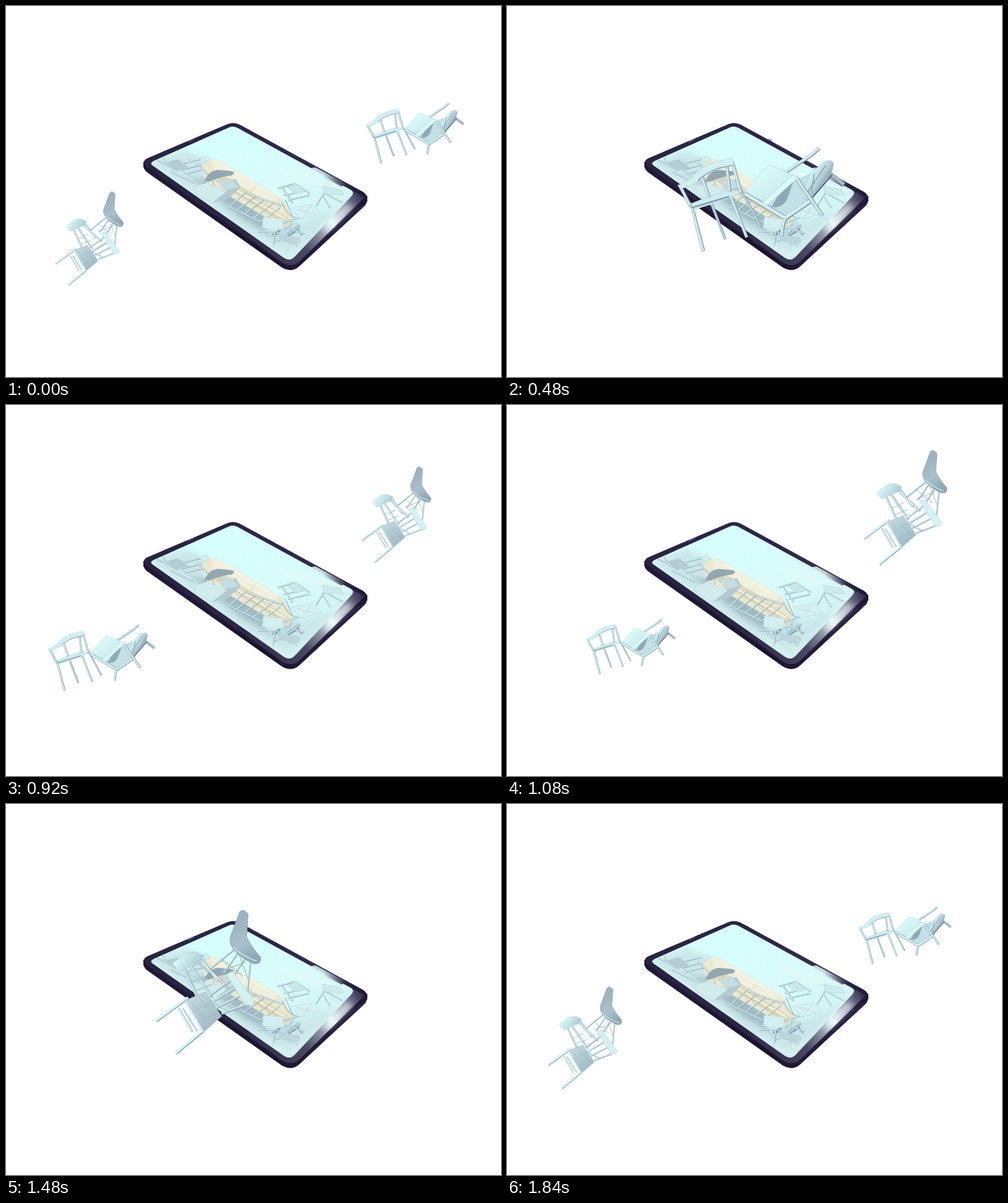
An HTML page for the animation above (1.88 s loop, 800x600 px).

```html
<!DOCTYPE html>
<html lang="en">
<head>
<meta charset="utf-8">
<title>Chairs around a tablet</title>
<style>
  html, body { margin: 0; width: 100%; height: 100%; overflow: hidden; background: #fff; }
  svg { display: block; width: 800px; height: 600px; }
</style>
</head>
<body>
<svg id="stage" viewBox="0 0 800 600" fill="none" stroke-linejoin="round"></svg>
<script>
const LOOP = 1880, STEP = 40, HALF = LOOP / 2;

const fill = (d, c, more = '') => `<path d="${d}" fill="${c}" ${more}/>`;
const line = (d, w, c) => `<path d="${d}" stroke="${c}" stroke-width="${w}"/>`;
// A rod has a shaded edge and a lit core.
const rod = (d, w, lit = '#cdeaee') =>
  line(d, w, '#8199a8') + `<g transform="translate(-.5 -.4)">${line(d, w * .7, lit)}</g>`;
const pad = (d, c) => fill(d, c, 'stroke="#b3d0d7" stroke-width=".6"');
const grad = (id, box, ...stops) => {
  const [x1, y1, x2, y2] = box;
  return `<linearGradient id="${id}" gradientUnits="userSpaceOnUse" x1="${x1}" y1="${y1}" x2="${x2}" y2="${y2}">` +
    stops.map(([at, c]) => `<stop offset="${at}" stop-color="${c}"/>`).join('') + '</linearGradient>';
};

const armchair =
  rod('M622 203L647 249', 3.2, '#b5d2da') + rod('M583 214L602 264', 3.6, '#b5d2da') +
  rod('M607 205L629 262', 4) + rod('M560 221L575 279', 4.4) +
  pad('M557 221L582 211L606 203L625 204L607 213L565 227Z', '#cdecef') +
  line('M560 225L607 211', 1.8, '#7e98a8') +
  rod('M546 198L559 223', 4.4) + rod('M573 186L582 212', 4) +
  rod('M604 172L608 205', 4) + rod('M611 168L622 207', 4.2) +
  pad('M543 197Q556 194 565 182Q572 174 590 168L611 163L613 172L593 177Q576 183 568 192Q557 200 546 201Z', '#d0eff1') +
  line('M568 191Q576 183 593 176L612 172', 1.2, '#86a2b0');

const lounge =
  rod('M719 151L710 159L677 181', 4.4) +
  rod('M733 183L750 196', 5, '#a5bfca') +
  pad('M657 204L708 183L716 200L696 223L676 236L640 214Z', '#c2e0e5') +
  pad('M724 168Q735 163 737 171L734 183L707 215Q699 218 697 209L709 182Z', 'url(#cush)') +
  line('M735 184L708 215', 1.8, '#56647f') +
  line('M727 172L703 208M713 182L709 207', 1.2, '#849fac') +
  pad('M628 203L656 172Q673 176 691 188L678 216Q672 226 660 224Q644 213 628 208Z', 'url(#back)') +
  fill('M687 192L678 216Q672 226 660 224L667 211Z', '#8fa8b5') +
  rod('M627 208L677 238L712 214', 5.6, '#d2f2f3') +
  rod('M677 238Q673 247 673 260', 4.6) +
  rod('M690 187L723 235', 4.8) +
  pad('M648 219L686 184L693 187L654 222Z', '#d9fbfa');

const shell =
  rod('M677 124L645 150M682 128L664 154M690 137L672 165M698 140L694 178', 2.4) +
  line('M660 136L688 158M684 132L695 162M661 152L692 140', 1, '#9bb8c2') +
  fill('M684 76Q689 70 695 79L693 108Q700 122 711 134Q712 144 702 142Q684 135 675 122Q669 112 674 103Z', 'url(#shellFill)', 'stroke="#8ca5b1" stroke-width=".8"') +
  line('M676 121Q688 133 706 139', 1.6, '#c7dfe5');

const stool =
  rod('M612 147L631 189M621 145L649 186M633 139L668 172M636 137L656 165', 3.4) +
  line('M622 167L641 158M628 177L648 169', 1.2, '#a4c0ca') +
  pad('M597 142L616 128L627 127L638 132L635 139L606 152Z', 'url(#stoolFill)');

const spindle =
  rod('M618 186L577 216M637 229L602 258', 3.8, '#d9fbfa') +
  rod('M605 199L623 230', 2.6, '#d9fbfa') + rod('M611 200L629 229', 2) +
  rod('M645 184L672 164M650 191L680 173M655 199L688 182M661 207L698 193', 2.8) +
  rod('M634 184L672 204', 2.2) +
  pad('M667 156L675 152L703 190L701 195L692 196Z', '#d2f2f3') +
  fill('M613 190L640 179L661 210L637 231Z', 'url(#seat)', 'stroke="#9bb5bf" stroke-width=".6"') +
  line('M622 192L646 221M632 186L655 213M622 206L648 190M631 218L656 202', .6, '#98b2bd') +
  line('M614 191L637 230', 2.2, '#d3f1f2');

const face = 'M229 246L358 191Q368 187 378 192L576 300Q588 307 579 316L474 413Q462 424 446 415L228 261Q217 252 229 246Z';
const screen = 'M240 250L359 197Q366 193 374 197L555 296Q565 301 558 308L467 405Q459 414 449 407L237 258Q231 254 240 250Z';

const place = (shape, x, y, s, turn) =>
  `<g transform="translate(${x} ${y}) rotate(${turn}) scale(${s})">${shape}</g>`;
const smallLounge = `<g transform="translate(-690 -206)">${lounge}</g>`;

const sofa =
  fill('M316 259L330 248Q338 246 346 251L442 309L463 341L456 358L438 352L324 286Z', '#eae8d0') +
  fill('M330 248L349 252L441 309L430 321L402 304L336 267Z', '#f1f0dc') +
  fill('M323 274L344 268L459 345L454 357Z', '#e2dcbc') +
  line('M336 267L430 322M369 266L361 281M405 287L394 302', 1, '#d9d3b2') +
  line('M341 281L452 351', 1.2, '#c9c2a0') +
  line('M352 259L426 303M360 291L451 344', 2.5, '#f5f5e6');

const room =
  fill(screen, 'url(#wall)') +
  '<g clip-path="url(#glass)">' +
    fill('M230 252L290 233L350 258L475 352L530 332L458 415Z', '#cbe7ea', 'filter="url(#soft)"') +
    fill('M300 277L350 289L465 355L440 376L382 344Z', '#91a9b2', 'filter="url(#soft)" opacity=".7"') +
    fill('M435 262L500 277L560 302L500 290L450 276Z', '#e4fbf9', 'opacity=".5"') +
    sofa +
    rod('M244 249L277 266M252 242L259 257M286 255L318 247M284 265L315 257M289 272L320 264M308 254L326 272', 2) +
    pad('M259 253L278 248L295 261L274 267Z', '#b5ccd3') +
    pad('M313 247L323 243L330 248L319 253Z', '#d3efef') +
    rod('M266 268L303 286M286 267L309 283', 2) +
    line('M323 278L318 296M333 277L338 296M344 274L357 291', 1.2, '#a3bcc4') +
    pad('M305 292L325 286L357 300L334 318L306 304Z', '#d2ebed') +
    pad('M334 318L357 300L350 287L371 280L379 293L360 311Z', '#b2c9d0') +
    pad('M342 283L365 280L377 293L354 298Z', '#c5dce0') +
    fill('M321 284Q326 267 342 265L364 267Q373 270 364 274Q343 277 329 284Z', '#91a8b2') +
    rod('M358 328L389 300M370 333L403 308M384 338L417 313M398 345L432 319M412 350L443 326', 2.2) +
    rod('M389 303L447 323M361 325L413 350', 2.4) +
    rod('M439 295L466 287L491 303M449 306L479 300M456 314L490 306M447 295L463 319', 2.4) +
    pad('M454 293L468 287L484 300L468 304Z', '#cae7ea') +
    line('M447 318Q455 345 479 344M451 313L463 340', 1.6, '#a6c0c8') +
    pad('M462 327L496 321L509 336L475 345Z', '#d5f1f1') +
    line('M470 329L500 337M479 343L493 324', .8, '#b4ced5') +
    rod('M501 324L514 302M514 302L544 318M511 306L524 327', 2) +
    pad('M511 291L541 297L546 306L515 304Z', '#cdeaec') +
    place(smallLounge, 447, 366, .52, 18) +
    pad('M416 341L449 345L446 362L414 359Z', '#d3eff0') +
    rod('M407 365L435 365L431 390M450 357L481 368M437 365L471 389', 2.4) +
    pad('M440 370L472 374Q479 379 472 385L443 380Z', '#bdd5db') +
    fill('M390 374Q430 380 456 400L490 373L460 416Z', '#dbf6f5', 'filter="url(#soft)" opacity=".7"') +
  '</g>';

const tablet =
  `<g transform="translate(0 8)">${fill(face, 'url(#side)')}</g>` +
  fill('M222 252V261L460 400L584 316V307Z', '#1b1531') +
  fill(face, 'url(#bezel)') +
  fill('M388 371L410 373L455 404L556 297L580 309L474 413Q462 424 446 415Z', 'url(#gloss)') +
  room +
  fill('M487 263L500 261L551 288L542 292Z', 'url(#shine)', 'opacity=".85"') +
  fill('M512 362L550 322L560 324L522 362Z', '#f4ffff', 'filter="url(#soft)" opacity=".8"') +
  line('M294 220L304 215', 1.6, '#575471');

document.getElementById('stage').innerHTML = `<defs>
  ${grad('wall', [350, 200, 460, 410], [0, '#d5fffd'], [.55, '#d9fbfa'], [1, '#cdeff0'])}
  ${grad('bezel', [230, 250, 580, 320], [0, '#292440'], [.55, '#2b2644'], [.82, '#34304b'], [1, '#1d1834'])}
  ${grad('side', [230, 260, 580, 350], [0, '#211b38'], [.6, '#19132d'], [1, '#2a2445'])}
  ${grad('gloss', [420, 418, 580, 308], [0, '#302b47'], [.35, '#4c4a62'], [.52, '#8f95a5'], [.65, '#e6f8f9'], [.78, '#9a9fb0'], [1, '#2b2642'])}
  ${grad('shine', [488, 263, 551, 290], [0, '#d9f7f7'], [.4, '#d6edf0'], [.75, '#6e7083'], [1, '#2b2642'])}
  ${grad('cush', [709, 180, 731, 194], [0, '#d9f8f8'], [.5, '#b9d5dc'], [1, '#7d96a7'])}
  ${grad('back', [648, 178, 676, 224], [0, '#d8fbfa'], [.6, '#cfedef'], [1, '#b0cad2'])}
  ${grad('shellFill', [676, 90, 700, 135], [0, '#9db3bf'], [.6, '#a9c0ca'], [1, '#8fa8b5'])}
  ${grad('stoolFill', [603, 134, 625, 149], [0, '#d8fbfa'], [1, '#b2ced6'])}
  ${grad('seat', [619, 190, 652, 222], [0, '#bfd8de'], [1, '#a1bac4'])}
  <filter id="soft" x="-30%" y="-30%" width="160%" height="160%"><feGaussianBlur stdDeviation="5"/></filter>
  <clipPath id="glass"><path d="${screen}"/></clipPath>
</defs>
<g id="behind"></g>
<g>${tablet}</g>
<g id="ahead"></g>
<g id="pair">${armchair}${lounge}</g>
<g id="trio">${shell}${stool}${spindle}</g>`;

const el = id => document.getElementById(id);

// Path rows: ms from the nearest point of the orbit, x, y, scale.
const groups = [
  { node: el('pair'), front: 480, home: [647, 214, 1], path: [
    [-600, 608, 226, .69], [-520, 643, 212, .722], [-480, 661, 205, .762], [-380, 671, 202, .88],
    [-280, 647, 214, 1], [0, 411, 312, 1.3], [280, 175, 404, 1.01], [400, 150, 410, .87],
    [600, 200, 390, .694], [940, 405, 300, .58]] },
  { node: el('trio'), front: 1420, home: [643, 166, .797], path: [
    [-660, 568, 204, .581], [-500, 630, 177, .665], [-340, 643, 166, .797], [-260, 611, 175, .87],
    [0, 382, 265, 1.01], [60, 326, 288, 1], [260, 157, 359, .86], [340, 126, 373, .79],
    [420, 125, 378, .709], [460, 134, 376, .651], [660, 215, 349, .576], [940, 394, 276, .53]] }
];
for (const g of groups)
  g.path = [-LOOP, 0, LOOP].flatMap(d => g.path.map(([u, ...v]) => [u + d, ...v]));

// Smooth curve through the rows, with slopes taken from the neighbours.
function sample(path, u) {
  const i = path.findIndex(r => r[0] > u) - 1;
  const [p, a, b, n] = path.slice(i - 1, i + 3);
  const span = b[0] - a[0], k = (u - a[0]) / span;
  return [1, 2, 3].map(c => {
    const ma = (b[c] - p[c]) / (b[0] - p[0]) * span;
    const mb = (n[c] - a[c]) / (n[0] - a[0]) * span;
    const d = b[c] - a[c];
    return a[c] + k * (ma + k * (3 * d - 2 * ma - mb + k * (ma + mb - 2 * d)));
  });
}

function draw(t) {
  for (const { node, front, home, path } of groups) {
    const u = (t - front + HALF + LOOP) % LOOP - HALF;
    const [x, y, s] = sample(path, u);
    node.setAttribute('transform',
      `translate(${x} ${y}) scale(${s / home[2]}) translate(${-home[0]} ${-home[1]})`);
    const layer = el(Math.abs(u) < 500 ? 'ahead' : 'behind');
    if (node.parentNode !== layer) layer.append(node);
  }
}

const start = performance.now();
function tick() {
  const t = (performance.now() - start) % LOOP;
  draw(Math.floor(t / STEP) * STEP);
  requestAnimationFrame(tick);
}
tick();
</script>
</body>
</html>
```
